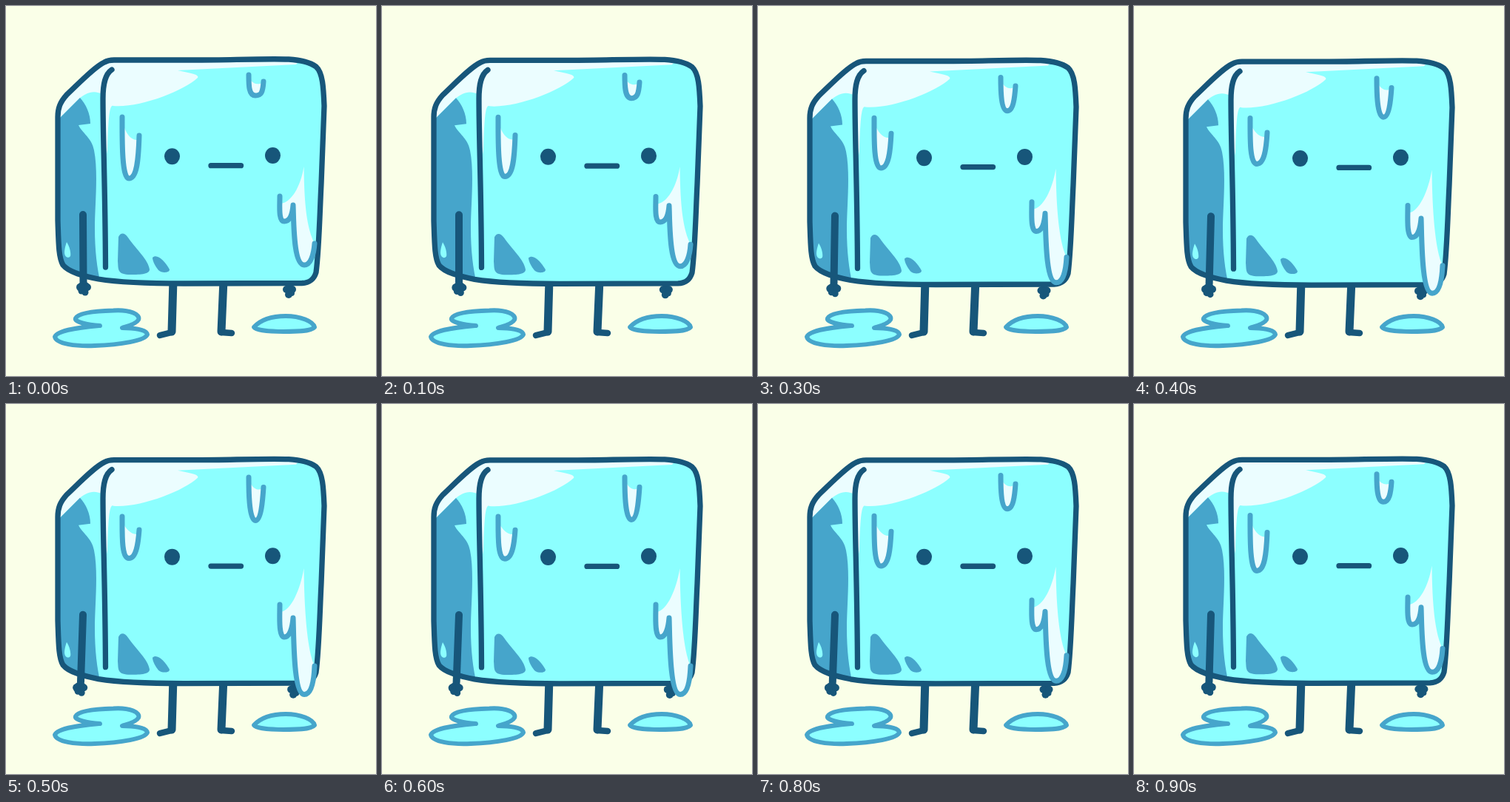
These frames come from a looping animation (500x500 px, 1000 ms). An HTML page:

```html
<!DOCTYPE html>
<html lang="en">
<head>
<meta charset="utf-8">
<title>Melting ice cube</title>
<style>
html, body { margin: 0; width: 100%; height: 100%; overflow: hidden; background: #faffe8; }
svg { display: block; width: 100%; height: 100%; }
.ink { fill: none; stroke: #17567a; stroke-width: 7.3; }
.solid { fill: #17567a; }
.mid { fill: #46a5cb; }
.ice { fill: #8cffff; }
.shine { fill: #ebfdff; }
.wet { stroke: #46a5cb; stroke-width: 6; }
.drip { fill: none; stroke: #46a5cb; stroke-width: 7; }
</style>
</head>
<body>
<svg viewBox="0 0 500 500" stroke-linecap="round" stroke-linejoin="round">
  <defs>
    <path id="cube" d="M146 73H260C300 73 350 71 382 72C398 73 412 77 419 82C428 90 429 110 430 135L426 240C424 280 423 330 419 360C416 370 410 374 400 374.5L240 375C190 375 150 373 125 369C105 365 85 360 77 350C71 340 71 320 70 290V150C70 138 73 130 82 120C100 103 120 82 133 76C138 73 142 73 146 73Z"/>
    <clipPath id="inside"><use href="#cube"/></clipPath>
  </defs>

  <g class="ice wet">
    <path d="M127 432C110 431 92 427 94 422C98 414 125 412 145 411.5C168 410 182 417 179 424C176 430 163 433 157 435C172 435 190 437 191 444C188 452 155 458 120 459C95 460 68 457 66 447C70 437 105 434 127 432Z"/>
    <path d="M335 434C345 423 360 419 378 419C398 419 415 426 417 434C412 440 390 440 375 440C355 440 338 438 335 434Z"/>
  </g>
  <path class="ink" style="stroke-width:11" d="M226 370L224 440M294 370L291 440"/>
  <path class="ink" style="stroke-width:8.5" d="M224 441L208 445M291 441L305 442"/>

  <g id="handR" class="solid">
    <circle cx="383" cy="383" r="7"/><circle cx="379" cy="383" r="5"/><circle cx="387" cy="383" r="5"/>
    <circle cx="382" cy="390" r="5"/><circle cx="386" cy="388" r="4"/>
  </g>

  <g id="body">
    <use href="#cube" class="ice"/>
    <g clip-path="url(#inside)">
      <path class="shine" d="M66 158L100 124C108 118 118 112 132 120L134 85L146 70H120L66 130Z"/>
      <path class="mid" d="M66 158L100 124C108 133 114 145 114 159L98 161C103 172 116 178 119 195C125 225 120 270 120 300C120 330 123 355 128 375H66Z"/>
      <path class="shine" d="M134 84L146 70H400L392 79L232 87C245 90 262 92 259 97C240 115 180 138 145 135C140 132 138 150 137 200L133 180Z"/>
      <path class="ice" d="M82 319C86 325 88 334 87 338C84 342 79 339 79 333C79 328 81 322 82 319Z"/>
    </g>
    <path class="mid" d="M152 312C155 306 160 306 165 313C175 328 192 342 194 356C194 363 180 363 165 363C150 362 152 355 151 345Z"/>
    <path class="mid" d="M198 340C204 334 215 345 221 356C221 361 210 361 206 357C202 352 198 345 198 340Z"/>
    <use href="#cube" class="ink"/>
    <path class="ink" d="M143 86C134 92 131 105 131 125C131 180 134 240 134.5 353"/>
  </g>

  <g id="face">
    <ellipse class="solid" cx="224.5" cy="203.3" rx="10.5" ry="11"/>
    <ellipse class="solid" cx="360.5" cy="202" rx="10.5" ry="11"/>
    <path class="ink" d="M277 215.7H317.5"/>
  </g>

  <path id="arm" class="ink" style="stroke-width:10"/>
  <g id="handL" class="solid">
    <circle cx="105" cy="380" r="8"/><circle cx="100.5" cy="380" r="5.5"/><circle cx="110" cy="380" r="5"/>
    <circle cx="102" cy="385" r="4.5"/><circle cx="107" cy="387" r="4.5"/>
  </g>
  <g id="drips"></g>
</svg>
<script>
const $ = id => document.getElementById(id);
// Ten poses per loop, 0 = start and 1 = furthest
const SAG = [0, .12, .31, .5, .72, .88, .97, 1, .93, .77];
const SMALL = [0, .1, .31, .57, .8, 1, .97, .8, .57, .31];
const BIG = [0, .04, .28, .56, .9, 1, 1, .9, .57, .29];

const drip = (line, top) =>
  `<path class="shine" d="${line}${top}Z"/><path class="drip" d="${line}"/>`;
const move = (id, x, y) => $(id).setAttribute("transform", `translate(${x} ${y})`);

function leftDrip(k) {
  const a = 150 + 2 * k, b = 233 - 24.5 * k, e = 175 - 5 * k;
  return drip(`M157 ${a}C157 ${a + 25} 156 ${b} 166 ${b}C177 ${b} 179 ${b - 25} 180 ${e}`,
    `V${e + 5}C172 ${e + 9} 162 ${e} 158 ${a + 8}`);
}

function topDrip(k) {
  const a = 93 + 6 * k, b = 121 + 36.5 * k, e = 102 + 10.5 * k;
  return drip(`M328 ${a}C328 ${a + 14} 328 ${b} 337 ${b}C345 ${b} 347 ${e + 15} 348 ${e}`,
    `C344 ${e + 5} 334 ${e + 5} 329 ${a + 5}`);
}

function rightDrip(k) {
  const a = 257 + 14 * k, v = 291 + 24 * k, j = 269 + 20 * k,
    b = 350 + 42.5 * k, e = 321 + 33 * k, tip = 217 + 5 * k;
  return drip(`M370 ${a}C370 ${a + 14} 368 ${v} 376 ${v}C384 ${v} 387 ${j + 12} 388 ${j}` +
    `C389 ${j + 22} 388 ${b} 403 ${b}C412 ${b} 416 ${b - 15} 417 ${e}`,
    `C407 ${e - 20} 403 ${tip + 55} 402.5 ${tip}C398 ${tip + 28} 385 ${a + 9} 371 ${a + 10}`);
}

function draw(now) {
  const i = Math.floor(now % 1000 / 100), s = SAG[i];
  move("body", 0, 3 * s);
  move("face", 0, 3.8 * s);
  move("handL", -5.5 * s, 3.7 * s);
  move("handR", 7 * s, 3 * s);
  $("arm").setAttribute("d", `M104 ${282 + 3 * s}L${104.5 - 4 * s} ${373 + 3 * s}`);
  $("drips").innerHTML = leftDrip(SMALL[i]) + topDrip(SMALL[i]) + rightDrip(BIG[i]);
}

const start = performance.now();
function tick() {
  draw(performance.now() - start);
  requestAnimationFrame(tick);
}
tick();
</script>
</body>
</html>
```
